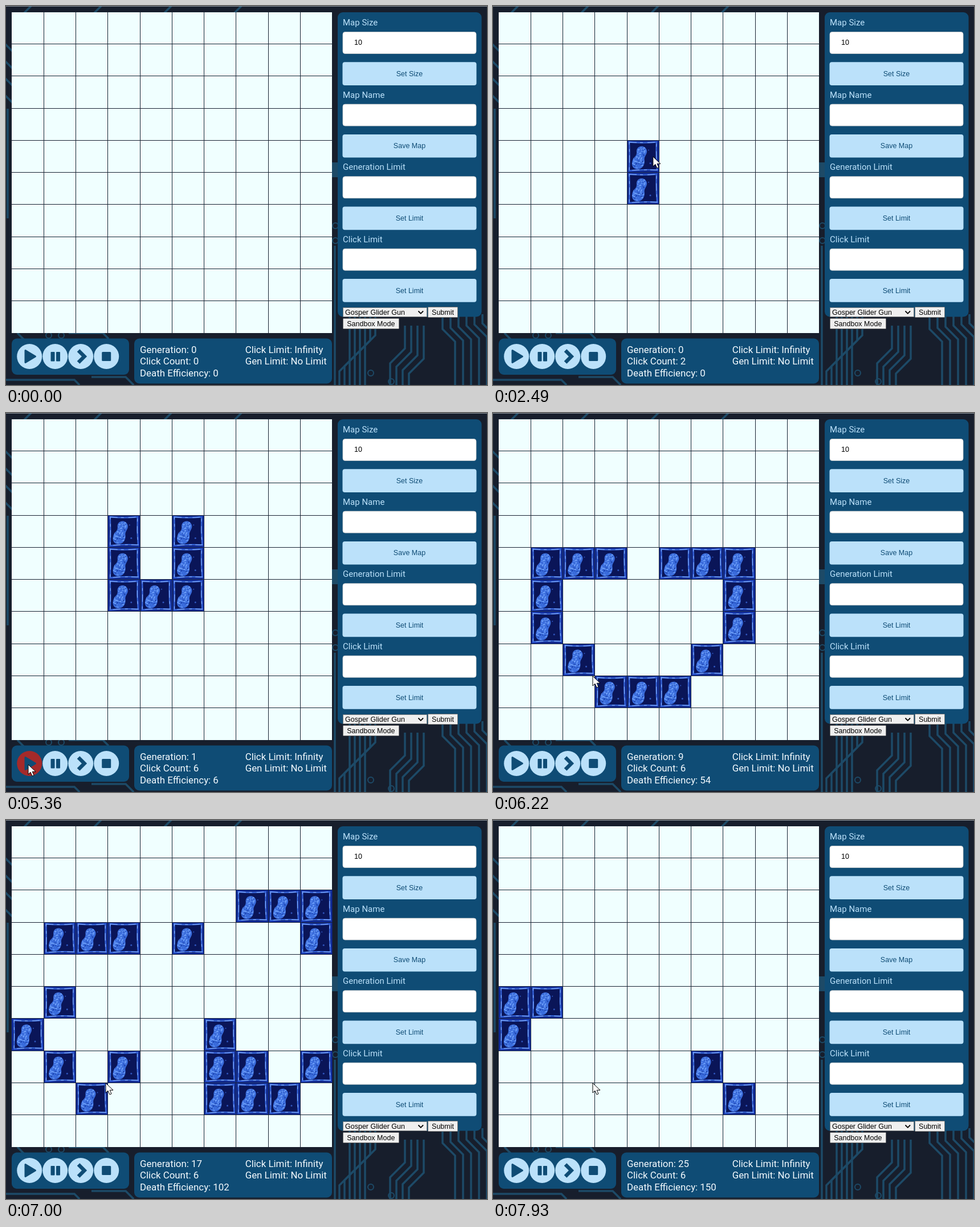
Animation, 844 px wide and 664 px high, one loop 8 s. Source, as an HTML page:

```html
<!DOCTYPE html>
<html lang="en">
<head>
<meta charset="utf-8">
<title>Game of Life</title>
<style>
  html, body { margin: 0; width: 100%; height: 100%; overflow: hidden; background: #171e2c; }
  svg { display: block; }
  text { white-space: pre; }
  .label { font: 15px Roboto, sans-serif; fill: #bbe1fa; }
  .stat { font: 16.875px Roboto, sans-serif; fill: #f4fbff; }
  .ui { font: 12.5px "Liberation Sans", Arial, sans-serif; fill: #000; }
  .mid { text-anchor: middle; }
  .panel, .icon { fill: #0f4c75; }
  .light { fill: #bbe1fa; }
  .board { fill: #f0ffff; }
  .field { fill: #fff; stroke: #ccc; stroke-width: .8; }
  .native { fill: #efefef; stroke: #767676; }
  .trace { fill: none; stroke: #1d4a67; stroke-width: 3.5; }
</style>
</head>
<body>
<svg id="stage" width="844" height="664" viewBox="0 0 844 664"></svg>
<script>
const N = 10, SIZE = 56.25, LEFT = 10, TOP = 10.4, LOOP = 8000;
const range = n => [...Array(n).keys()];
const get = id => document.getElementById(id);

let seed = 11;
const random = () => (seed = (seed * 16807) % 2147483647) / 2147483647;

const rect = (x, y, w, h, cls, r = 0) =>
  `<rect x="${x}" y="${y}" width="${w}" height="${h}" rx="${r}" class="${cls}"/>`;
const text = (s, x, y, cls, id = '') => `<text id="${id}" x="${x}" y="${y}" class="${cls}">${s}</text>`;
const path = d => `<path d="${d}"/>`;

// Circuit board behind the panels
function background() {
  const ring = (x, y) => `<circle cx="${x}" cy="${y}" r="5" stroke-width="2"/>`;
  const fan = range(6).map(i =>
    path(`M${603 + i * 9} 540V${622 - i * 9}l-18 18V664`) +
    path(`M${766 + i * 14} 540v${26 - i * 2}l22 22V664`));
  const middle = range(4).map(i => path(`M${700 + i * 11} 560V${600 + i * 6}l-26 26V664`));
  const edges = range(4).map(i => path(`M${30 + i * 123} 14l14 -14M-2 ${66 + i * 30}l14 14`));
  return `<g class="trace">${[...fan, ...middle, ...edges].join('')}
    ${path('M3 180V372M577 420V664M20 573l14 14M110 573h60l10 10M0 655H120l9 9M150 650h60l14 14')}
    <path d="M572 287H583" stroke-width="26"/>
    ${ring(75, 577)}${ring(97, 577)}${ring(578, 385)}${ring(578, 411)}${ring(640, 643)}${ring(676, 658)}</g>
    <rect width="844" height="1" fill="#8d939b"/>`;
}

// One living cell: bright membrane and a speckled two-lobed nucleus
function cellArt() {
  const speckles = range(90).map(i => {
    const [cx, cy, rx, ry] = i % 5 < 2 ? [26, 20, 8, 8] : [20, 38, 10, 11];
    const angle = random() * 2 * Math.PI, d = Math.sqrt(random());
    return `<circle cx="${cx + rx * d * Math.cos(angle)}" cy="${cy + ry * d * Math.sin(angle)}"
      r="${.5 + random()}" fill="${random() < .7 ? '#6c9ef8' : '#1f48b4'}"/>`;
  });
  const membrane = 'M4 3Q28 5 52 3Q51 28 53 52Q28 51 4 53Q5 28 4 3Z';
  return `<g id="cell"><rect width="56.3" height="56.3" fill="#0a1558"/>
    <g fill="none"><rect x="1" y="1" width="54" height="54" stroke="#1230a8" stroke-width="2"/>
    <path d="${membrane}" stroke="#3563d8" stroke-width="2.5"/>
    <path d="${membrane}" stroke="#7dabff" stroke-width="1.2" stroke-dasharray="13 6 5 8"/></g>
    <path d="M17 21C15 9 32 6 35 18C36 25 29 28 31 36C31 46 24 52 15 50C7 47 8 38 11 32C14 28 17 27 17 21Z" fill="#3a6cdc"/>
    ${speckles.join('')}
    <g fill="#2f55bd"><circle cx="41" cy="40" r="1.5"/><circle cx="38" cy="17" r="1"/></g></g>`;
}

function grid() {
  const cells = range(N * N).map(i =>
    `<use class="life" href="#cell" x="${LEFT + SIZE * (i % N)}" y="${TOP + SIZE * Math.floor(i / N)}"/>`);
  const lines = range(N).slice(1).map(k =>
    `M${Math.floor(LEFT + SIZE * k) + .5} 11v562M10 ${Math.floor(TOP + SIZE * k) + .5}h562`);
  return rect(10, 11, 562, 562, 'board') + cells.join('') + `<path d="${lines.join('')}" stroke="#1a2333"/>`;
}

function sidebar() {
  const fields = [['Map Size', 'Set Size'], ['Map Name', 'Save Map'],
    ['Generation Limit', 'Set Limit'], ['Click Limit', 'Set Limit']];
  return rect(582, 11, 252.5, 533.5, 'panel', 9) + fields.map(([label, action], i) => {
    const y = i * 126.6;
    return text(label, 591, 34 + y, 'label') + rect(591, 45.5 + y, 234, 38, 'field', 4) +
      rect(590.5, 98.3 + y, 235, 40.7, 'light', 4) + text(action, 708, 122.7 + y, 'ui mid icon');
  }).join('') +
    text('10', 611, 68, 'ui') +
    rect(591.5, 528.5, 147, 16, 'native field') + text('Gosper Glider Gun', 595, 541, 'ui') +
    '<path d="M723.5 534.5l4.3 4.3 4.3-4.3" fill="none" stroke="#000" stroke-width="1.8"/>' +
    rect(740.5, 527.5, 52, 18, 'native', 1) + text('Submit', 766.5, 541, 'ui mid') +
    rect(591.5, 547.5, 98, 18, 'native', 1) + text('Sandbox Mode', 640.3, 560.5, 'ui mid');
}

function controls() {
  const icons = [
    '<path d="M34 603.5L51.5 614L34 624.5Z" stroke="#0f4c75" stroke-width="3" stroke-linejoin="round"/>',
    rect(78.5, 606, 7, 16.5, '', 1) + rect(88, 606, 7, 16.5, '', 1),
    '<path d="M127 603.5L137.5 614L127 624.5" fill="none" stroke="#0f4c75" stroke-width="6.5"/>',
    rect(168.2, 606, 16, 16, '', 1.5)
  ];
  return rect(10, 582.5, 206, 63.5, 'panel', 9) + icons.map((icon, i) =>
    `<circle class="button" cx="${41.2 + 45 * i}" cy="614" r="22"/><g class="icon">${icon}</g>`).join('');
}

function stats() {
  return rect(225, 582.5, 347, 79, 'panel', 9) +
    text('', 235, 608, 'stat', 'generation') + text('', 235, 628, 'stat', 'clicks') +
    text('', 235, 648.5, 'stat', 'efficiency') +
    text('Click Limit: Infinity', 419.7, 608, 'stat') + text('Gen Limit: No Limit', 419.7, 628, 'stat');
}

get('stage').innerHTML = `<defs>${cellArt()}</defs>` + background() + grid() + sidebar() + controls() + stats() +
  '<path id="cursor" d="M0 0V17L4 13.3L7 20L10 18.7L7.2 12.3H13Z" fill="#fff" stroke="#000"/>';

// Pointer stops; each move takes MOVE ms, a click follows its stop by PRESS ms
const MOVE = 180, PRESS = 170;
const STOPS = [
  { at: 560, x: 70, y: 600 }, { at: 950, x: 258, y: 256 }, { at: 1220, x: 258, y: 290 },
  { at: 1450, x: 257, y: 322, click: true }, { at: 2090, x: 259, y: 264, click: true },
  { at: 2620, x: 336, y: 264, click: true }, { at: 3170, x: 327, y: 206, click: true },
  { at: 3510, x: 259, y: 209 }, { at: 3720, x: 194, y: 210, click: true },
  { at: 4260, x: 207, y: 249, click: true }, { at: 4740, x: 62, y: 621 },
  { at: 5060, x: 39, y: 616 }, { at: 5900, x: 175, y: 461 }
];
const CLICKS = STOPS.filter(s => s.click).map(s => ({
  at: s.at + PRESS,
  cell: Math.floor((s.y - TOP) / SIZE) * N + Math.floor((s.x - LEFT) / SIZE)
}));
const HOVERS = [
  { from: 130, to: 210, button: 3 }, { from: 210, to: 440, button: 1 },
  { from: 440, to: 600, button: 0 }, { from: 4980, to: 5720, button: 0 }
];

// Generations start at START; the interval begins at PERIOD and grows slowly
const START = 5355, PERIOD = 97, SLOWING = .36;
const generationAt = t => t < START ? 0 :
  1 + Math.floor((Math.sqrt(PERIOD ** 2 + 4 * SLOWING * (t - START)) - PERIOD) / (2 * SLOWING));

// Everything outside the board counts as dead
const evolve = board => board.map((alive, i) => {
  const x = i % N, y = Math.floor(i / N);
  let count = -alive;
  for (let r = Math.max(0, y - 1); r <= Math.min(N - 1, y + 1); r++)
    for (let c = Math.max(0, x - 1); c <= Math.min(N - 1, x + 1); c++) count += board[r * N + c];
  return +(count === 3 || (alive && count === 2));
});
const boardOf = clicks => range(N * N).map(i => +clicks.some(c => c.cell === i));
const boards = [boardOf(CLICKS)];
while (boards.length <= generationAt(LOOP)) boards.push(evolve(boards[boards.length - 1]));

const cursor = get('cursor');
const lives = document.querySelectorAll('.life'), buttons = document.querySelectorAll('.button');

function movePointer(t) {
  const hidden = t < STOPS[0].at || (t >= 4750 && t < 4980);
  cursor.style.display = hidden ? 'none' : '';
  if (hidden) return;
  const next = STOPS.findIndex(s => s.at > t);
  const b = STOPS[next < 0 ? STOPS.length - 1 : next], a = next < 0 ? b : STOPS[next - 1];
  const k = Math.min(1, Math.max(0, 1 - (b.at - t) / MOVE));
  cursor.setAttribute('transform', `translate(${a.x + (b.x - a.x) * k} ${a.y + (b.y - a.y) * k})`);
}

function draw(now) {
  const t = now % LOOP;
  const clicks = CLICKS.filter(c => c.at <= t), generation = generationAt(t);
  const board = generation ? boards[generation] : boardOf(clicks);
  lives.forEach((cell, i) => { cell.style.display = board[i] ? '' : 'none'; });
  const hover = HOVERS.find(h => t >= h.from && t < h.to);
  buttons.forEach((b, i) => { b.style.fill = hover && hover.button === i ? '#a52a2a' : '#bbe1fa'; });
  get('generation').textContent = `Generation: ${generation}`;
  get('clicks').textContent = `Click Count: ${clicks.length}`;
  get('efficiency').textContent = `Death Efficiency: ${clicks.length * generation}`;
  movePointer(t);
  requestAnimationFrame(draw);
}
draw(0);
</script>
</body>
</html>
```
